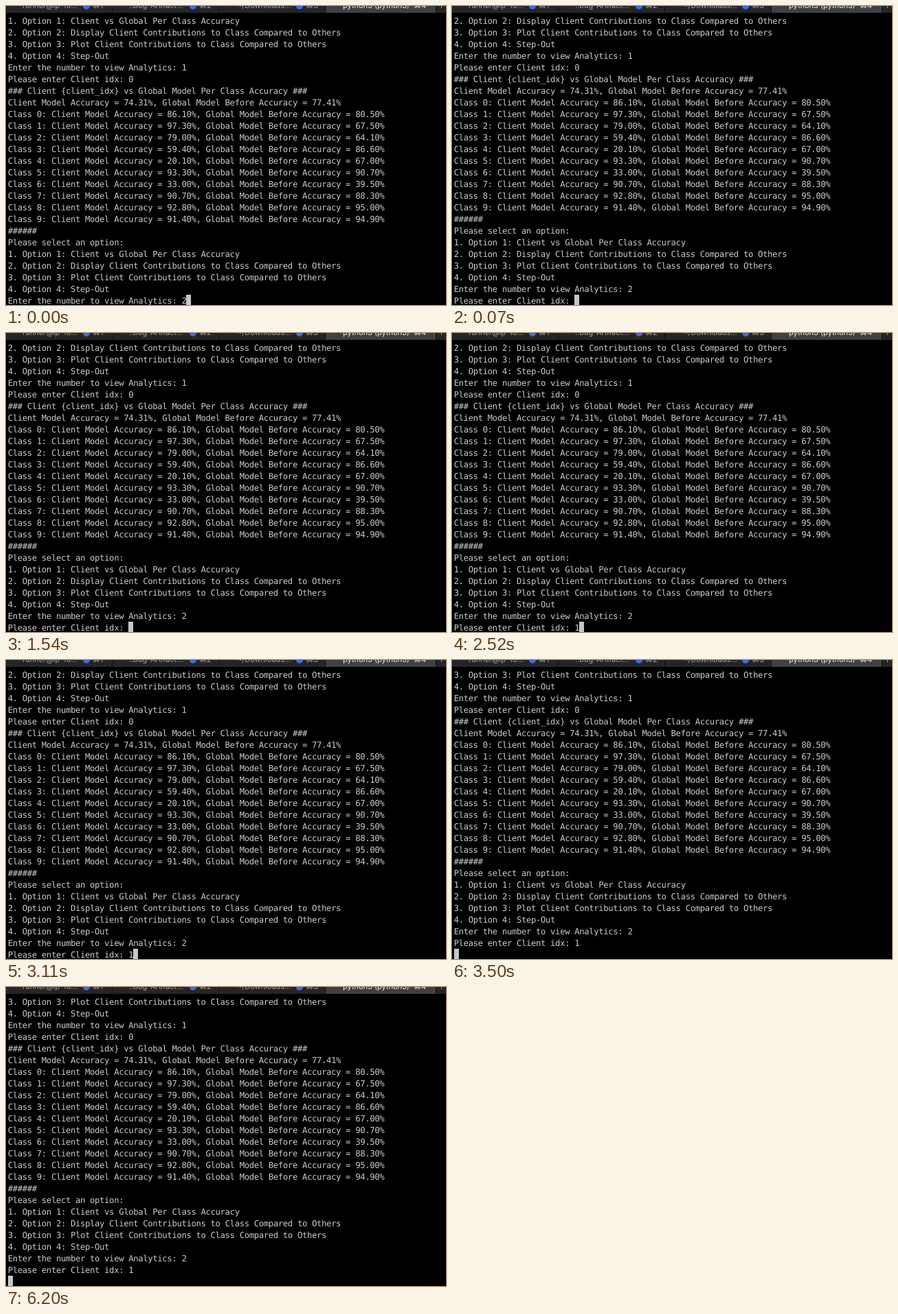
Animation, 640 px wide and 436 px high, one loop 8000 ms. Source, as an HTML page with a canvas:

```html
<!DOCTYPE html>
<html lang="en">
<head>
<meta charset="utf-8">
<title>Terminal session</title>
<style>
  html, body { margin: 0; width: 100%; height: 100%; overflow: hidden; background: #000; }
  canvas { display: block; width: 640px; height: 436px; }
</style>
</head>
<body>
<canvas id="stage" width="640" height="436"></canvas>
<script>
const ctx = document.getElementById('stage').getContext('2d');
const W = 640, H = 436, LOOP = 8000;
const LEFT = 2.7, CHAR = 7.02, PITCH = 17, BASE = 26, ROWS = 25;
const BAR = 10, BAR_END = 625;
const MONO = '12.2px "DejaVu Sans Mono", monospace';
const UI = '11px Inter, "DejaVu Sans", sans-serif';

const menu = [
  '1. Option 1: Client vs Global Per Class Accuracy',
  '2. Option 2: Display Client Contributions to Class Compared to Others',
  '3. Option 3: Plot Client Contributions to Class Compared to Others',
  '4. Option 4: Step-Out'
];
const ASK = 'Enter the number to view Analytics: ';
const ASK_ID = 'Please enter Client idx: ';

// Client and global accuracy per class
const scores = [
  [86.1, 80.5], [97.3, 67.5], [79, 64.1], [59.4, 86.6], [20.1, 67],
  [93.3, 90.7], [33, 39.5], [90.7, 88.3], [92.8, 95], [91.4, 94.9]
];
const compare = ([client, all]) =>
  `Client Model Accuracy = ${client.toFixed(2)}%, Global Model Before Accuracy = ${all.toFixed(2)}%`;

const log = [
  ...menu,
  ASK + '1',
  ASK_ID + '0',
  '### Client {client_idx} vs Global Model Per Class Accuracy ###',
  compare([74.31, 77.41]),
  ...scores.map((pair, i) => `Class ${i}: ${compare(pair)}`),
  '######',
  'Please select an option:',
  ...menu,
  ASK + '2'
];

// Lines typed after the log, by start time
const steps = [
  [0, []],
  [70, [ASK_ID]],
  [2520, [ASK_ID + '1']],
  [3500, [ASK_ID + '1', '']]
];

const tabs = [
  { x: 0, label: 'runner@ip-10...', at: 24, dot: 117, key: 126 },
  { x: 155, label: '..bug-Artifact...', at: 179, dot: 272, key: 281 },
  { x: 310, label: '~/Downloads...', at: 336, dot: 427, key: 436 },
  { x: 465, label: 'python3 (python3)', at: 490, key: 593, active: true }
];

function box(x, y, w, h, color) {
  ctx.fillStyle = color;
  ctx.fillRect(x, y, w, h);
}

function text(str, x, y, font, color) {
  ctx.font = font;
  ctx.fillStyle = color;
  ctx.fillText(str, x, y);
}

function drawTabs() {
  ctx.letterSpacing = '0px';
  box(0, 0, W, BAR, '#252527');
  tabs.forEach((tab, i) => {
    const color = tab.active ? '#f0f0f0' : '#a2a2a4';
    if (tab.active) box(tab.x, 0, BAR_END - tab.x, BAR, '#404042');
    if (i) box(tab.x - 1, 0, 1, BAR, '#101011');
    text(tab.label, tab.at, 3, UI, color);
    text('⌘' + (i + 1), tab.key, 3, UI, color);
    if (tab.dot) {
      ctx.fillStyle = '#4169ee';
      ctx.beginPath();
      ctx.arc(tab.dot, 0, 5, 0, Math.PI * 2);
      ctx.fill();
    }
  });
  box(BAR_END, 0, 1, BAR, '#101011');
  box(633, 0, 1, 3, '#a2a2a4');
}

function drawLines(lines) {
  // Fit the glyph advance to the terminal's cell width
  ctx.font = MONO;
  ctx.letterSpacing = '0px';
  ctx.letterSpacing = `${CHAR - ctx.measureText('0').width}px`;
  lines.forEach((line, i) => text(line, LEFT, BASE + i * PITCH, MONO, '#cccccc'));
}

function draw(t) {
  const typed = steps.filter(([start]) => t >= start).pop()[1];
  const lines = [...log, ...typed].slice(-ROWS);
  const col = lines[lines.length - 1].length;
  box(0, 0, W, H, '#000');
  drawLines(lines);
  box(Math.round(LEFT + col * CHAR), 421, 7, 15, '#c7c7c7');
  drawTabs();
}

ctx.textRendering = 'geometricPrecision';
const began = performance.now();
function tick() {
  draw((performance.now() - began) % LOOP);
  requestAnimationFrame(tick);
}
tick();
</script>
</body>
</html>
```
